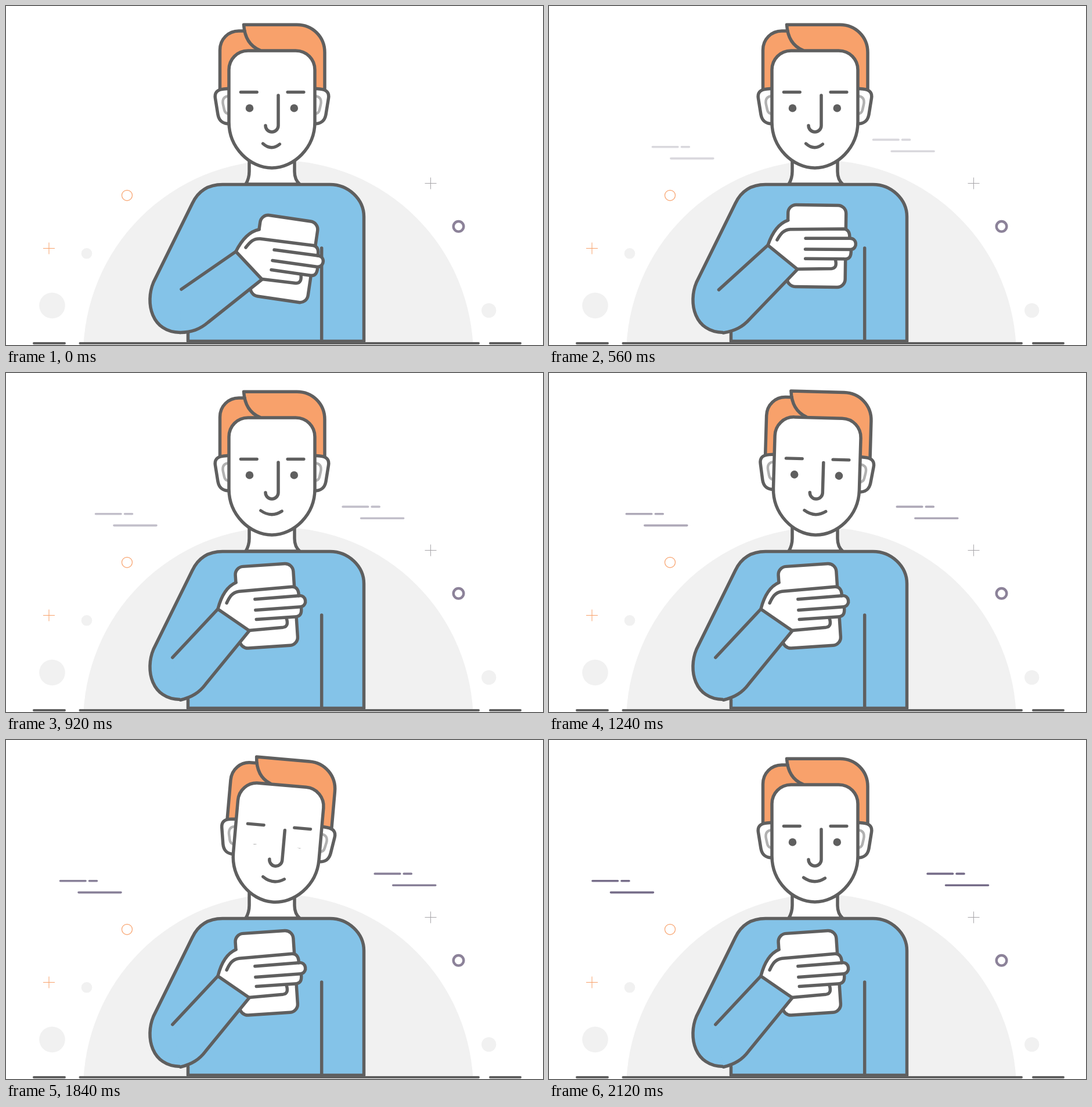
Write an HTML page with a canvas that moves like this. It is 925 px wide and 584 px high and loops after 2.16 s.

```html
<!DOCTYPE html>
<html lang="en">
<head>
<meta charset="utf-8">
<title>Man with phone</title>
<style>
html, body { margin: 0; width: 100%; height: 100%; overflow: hidden; background: #fff; }
canvas { display: block; }
</style>
</head>
<body>
<canvas id="stage" width="925" height="584"></canvas>
<script>
const ctx = document.getElementById('stage').getContext('2d');
const LOOP = 2160, STEP = 40;
const INK = '#5f5f5f', SKIN = '#fff', SHIRT = '#84c3e8', HAIR = '#f8a16b',
      PALE = '#f1f1f1', EAR = '#b1b1b1', PLUM = '#8c8299';
const W = 5.5;

const clamp = u => Math.max(0, Math.min(1, u));
const ease = (t, from, to) => {
  const u = clamp((t - from) / (to - from));
  return u * u * (3 - 2 * u);
};
const mix = (a, b, u) => a + (b - a) * u;

function shape(d, fill, stroke, width = W) {
  const p = typeof d === 'string' ? new Path2D(d) : d;
  if (fill) { ctx.fillStyle = fill; ctx.fill(p); }
  if (stroke) { ctx.strokeStyle = stroke; ctx.lineWidth = width; ctx.stroke(p); }
}

function circle(x, y, r, fill, stroke, width) {
  const p = new Path2D();
  p.arc(x, y, r, 0, Math.PI * 2);
  shape(p, fill, stroke, width);
}

function turned(x, y, deg, draw) {
  ctx.save();
  ctx.translate(x, y);
  ctx.rotate(deg * Math.PI / 180);
  ctx.translate(-x, -y);
  draw();
  ctx.restore();
}

function plus(x, y, color) {
  ctx.fillStyle = color;
  ctx.fillRect(x - 10, y - 0.5, 20, 1);
  ctx.fillRect(x - 0.5, y - 10, 1, 20);
}

function backdrop() {
  ctx.fillStyle = '#fff';
  ctx.fillRect(0, 0, 925, 584);
  ctx.save();
  ctx.beginPath();
  ctx.rect(0, 0, 925, 581);
  ctx.clip();
  circle(469, 602, 336, PALE);
  ctx.restore();
  circle(79.5, 516, 22.3, PALE);
  circle(139, 426.3, 9.3, PALE);
  circle(831.7, 524.5, 12.6, PALE);
  circle(208.5, 326.3, 9, null, HAIR, 1.2);
  circle(779.5, 379.8, 8.8, null, PLUM, 4.4);
  plus(74, 417.5, HAIR);
  plus(731.5, 305.5, '#a6a4a8');
  shape('M48 581H101M127.5 581H814M834 581H886', null, INK, 4);
}

function streaks(t) {
  if (t < 280) return;
  const u = (t - 280) / 1840;
  const color = `rgb(${mix(235, 118, u)},${mix(235, 109, u)},${mix(236, 137, u)})`;
  const group = (x, y) => shape(
    `M${x} ${y}h43.5M${x + 50} ${y}h13M${x + 31.5} ${y + 19.8}h73`, null, color, 3.6);
  group(189 - (t - 400) * 0.0663, 242.8);
  group(549 + (t - 400) * 0.0599, 230.4);
}

function body() {
  shape('M419 262V285C419 296 416 302 413 307H506C500 302 497 296 497 285V262', SKIN, INK);
  shape('M373 307.5H558C590 307.5 616.5 333 616.5 363V577.5H313.5V562' +
        'L300 562.5C251 562 239 512 254 476L321 340C331 319 347 307.5 373 307.5Z', SHIRT);
  shape('M300 562.5C251 562 239 512 254 476L321 340C331 319 347 307.5 373 307.5' +
        'H558C590 307.5 616.5 333 616.5 363V577.5H313.5V563', null, INK);
  shape('M543.7 417V577', null, INK);
}

function phone() {
  turned(479, 435.5, 8.4, () => {
    const p = new Path2D();
    p.roundRect(429, 365, 100, 141, 14);
    shape(p, SKIN, INK);
  });
}

function arm() {
  phone();
  shape('M302 488L396 423L441 471L348 545C334 557 320 562 300 562.5Z', SHIRT);
  const thumb = 'M396 423C404 407 416 389 436 385';
  const tips = 'L529 412.5C537 414 539 421 537 430C550 431 549 449 537 449.5' +
               'C536 460 533 466 523 464';
  shape(thumb + 'L444 388L437 401' + tips +
        'L508 463C509 472 507 478 499 477.5L441 470.5Z', SKIN);
  shape(thumb, null, INK);
  shape('M413 416C420 407 426 400 438 401' + tips + 'L457 454.5', null, INK);
  shape('M462 420L537 430M459 438.5L537 449.5', null, INK);
  shape('M508 463C509 472 507 478 499 477.5L441 470.5', null, INK);
  shape('M302 488L396 423L441 471L348 545C334 557 320 562 300 562.5', null, INK);
}

function ear() {
  shape('M386 142L375 143C363 144 359 150 360.5 159L365 187C367 198 373 203 386 203', SKIN, INK);
  shape('M386 155C375 155 372 161 374 170L376 179C377 184 380 186 386 186', null, EAR, 4.5);
}

function eye(x, lid) {
  const y = 176, r = 6.8;
  circle(x, y, r, INK);
  if (lid > 0) {
    ctx.fillStyle = SKIN;
    ctx.fillRect(x - 9, y - 9, 18, 9 - r + lid * r * 2);
  }
}

function head(lid, smile) {
  shape('M368.5 143V76C368.5 57 383 43 401 43H411L409.5 32.2H501' +
        'C528 32.2 549 53 549 80V143Z', HAIR);
  shape('M368.5 143V76C368.5 57 383 43 401 43H411', null, INK);
  shape('M437 76C420 69 411 54 409.5 32.2H501C528 32.2 549 53 549 80V143', null, INK);
  ear();
  ctx.save();
  ctx.translate(916, 0);
  ctx.scale(-1, 1);
  ear();
  ctx.restore();
  shape('M384 110C384 92 398 77 417 77H499C518 77 532 92 532 110V200' +
        'C532 244 496 279 458 279C420 279 384 244 384 200Z', SKIN, INK);
  eye(419.5, lid);
  eye(496.3, lid);
  shape('M404.3 148.3H432.3M485 148.3H513', null, INK, 5.2);
  shape('M469 154V206A11 11 0 0 1 447 206', null, INK);
  const left = mix(442.5, 438.5, smile), right = mix(471.5, 475.5, smile);
  shape(`M${left} 237Q457 250 ${right} 238`, null, INK, 5.2);
}

const blink = (t, start) => ease(t, start, start + 160) - ease(t, start + 160, start + 320);

function draw(t) {
  const swing = -12.2 * ease(t, 280, 760);
  const tilt = 5 * (ease(t, 960, 1680) - ease(t, 1840, 2080));
  const lid = blink(t, 600) + blink(t, 1700);
  ctx.lineCap = ctx.lineJoin = 'round';
  backdrop();
  streaks(t);
  body();
  turned(304, 560, swing, arm);
  turned(458, 284, tilt, () => head(lid, ease(t, 700, 960)));
}

const begin = performance.now();
function tick() {
  const t = (performance.now() - begin) % LOOP;
  draw(Math.floor(t / STEP) * STEP);
  requestAnimationFrame(tick);
}
tick();
</script>
</body>
</html>
```
